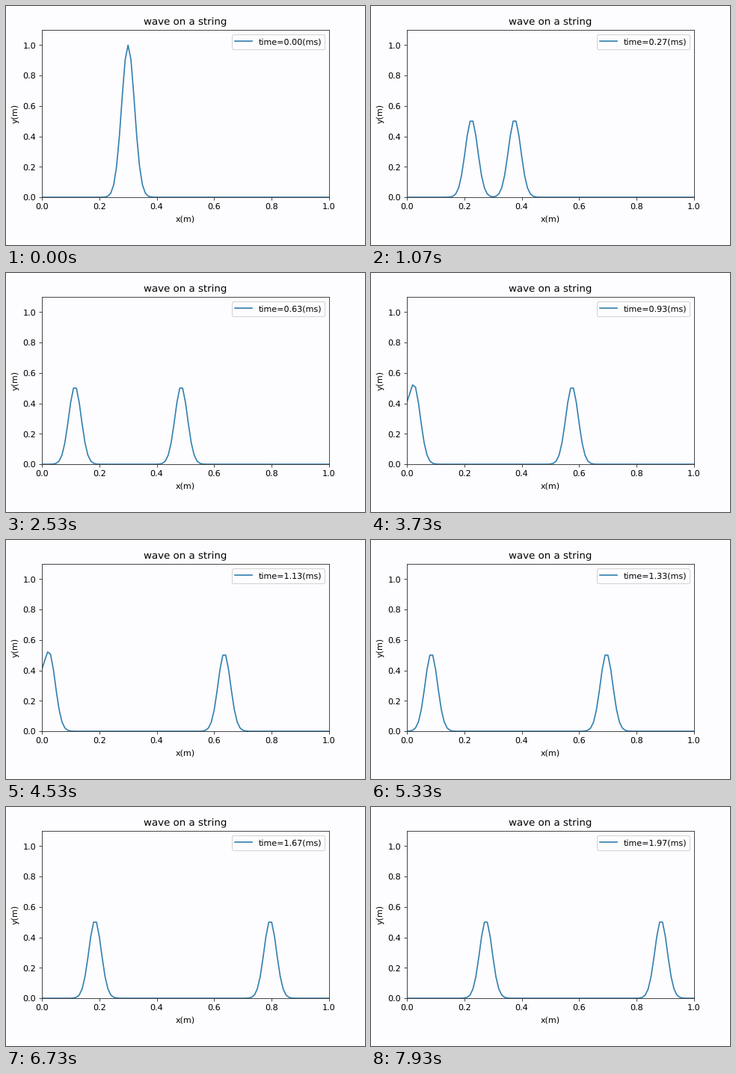
Recreate the animation shown at these times as a matplotlib script. Size 480x320 px, loop 8000 ms.

```python
import numpy as np
import matplotlib.pyplot as plt
from matplotlib.animation import FuncAnimation

LOOP = 8000      # ms
TICK = 20        # ms per drawn frame
STEPS = 60       # wave states per loop
DT = 1 / 30      # simulated ms per state
PAPER = "#fdfcfe"
BLUE = "#3280b0"
FRAME = "#333333"

plt.rcParams.update({
    "font.family": "DejaVu Sans", "font.size": 10, "text.hinting": "none",
    "axes.edgecolor": FRAME, "xtick.color": FRAME, "ytick.color": FRAME,
    "xtick.labelcolor": "black", "ytick.labelcolor": "black",
})


def next_state(now, before):
    """Leapfrog step at Courant number 1 with free ends."""
    padded = np.pad(now, 1, mode="edge")
    return padded[2:] + padded[:-2] - before


def simulate():
    pulse = np.exp(-1000 * (x - 0.3) ** 2)
    states = [pulse, pulse]
    while len(states) < STEPS:
        states.append(next_state(states[-1], states[-2]))
    return states


x = np.linspace(0, 1, 101)
waves = simulate()

fig = plt.figure(figsize=(6, 4), dpi=80, facecolor=PAPER)
ax = fig.add_axes([0.1, 0.2, 0.8, 0.7], facecolor=PAPER)
ax.set(xlim=(0, 1), ylim=(0, 1.1), title="wave on a string")
ax.set_xlabel("x(m)", labelpad=4.9)
ax.set_ylabel("y(m)")
line, = ax.plot(x, waves[0], color=BLUE, label="time=0.00(ms)")
legend = ax.legend(loc="upper right", bbox_to_anchor=(1, 0.996),
                   facecolor=PAPER)
label = legend.get_texts()[0]


def update(frame):
    # the offset rounds state changes to the nearest tick
    step = int((frame * TICK + 15) * STEPS / LOOP)
    line.set_ydata(waves[step])
    label.set_text(f"time={step * DT:.2f}(ms)")
    return line, label


anim = FuncAnimation(fig, update, frames=LOOP // TICK, interval=TICK,
                     repeat=True, repeat_delay=0)
plt.show()
```
